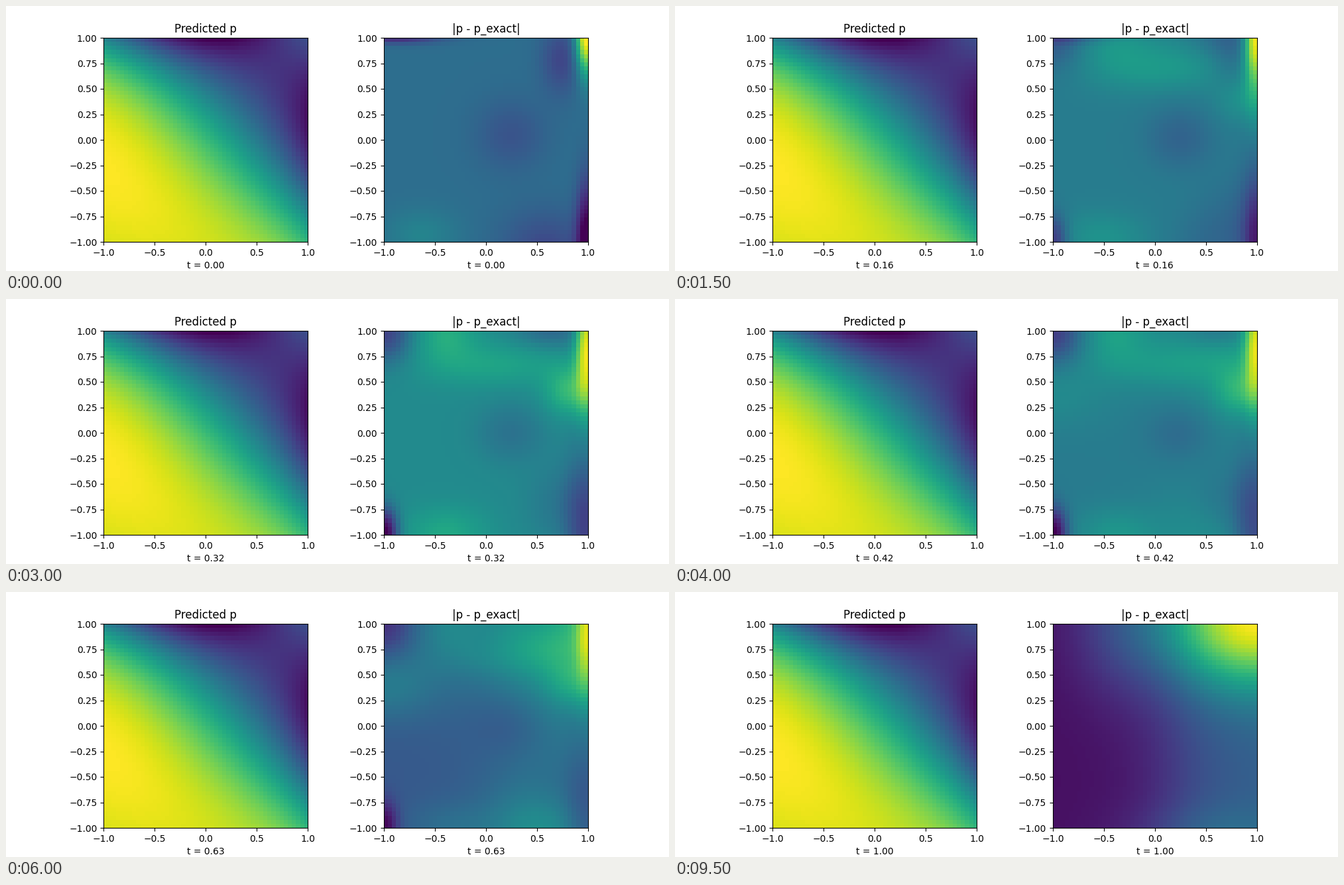
Write a matplotlib script that moves like this. It is 1000 px wide and 400 px high and loops after 10 s.

```python
import numpy as np
import matplotlib.pyplot as plt
from matplotlib.animation import FuncAnimation

N, FRAMES, INTERVAL = 50, 20, 500
MID = 0.32  # time at which the error is most spread out
axis = np.linspace(-1, 1, N)
X, Y = np.meshgrid(axis, axis)


def pressure(x, y, z=0.5):
    """Pressure of a Beltrami flow on one z slice, scaled to 0..1."""
    def term(a, b, c):
        return np.exp(2 * a) + 2 * np.sin(a + b) * np.cos(c + a) * np.exp(b + c)

    p = -(term(x, y, z) + term(y, z, x) + term(z, x, y))
    return (p - p.min()) / (p.max() - p.min())


def bump(amp, x, y, sx, sy):
    return amp * np.exp(-((X - x) / sx) ** 2 - ((Y - y) / sy) ** 2)


def start_pose():
    corners = bump(0.7, 1, 1.05, 0.1, 0.38) + bump(-0.36, 1, -1, 0.1, 0.6)
    dips = (bump(-0.1, 0.25, 0.05, 0.35, 0.35) + bump(-0.15, 0.75, 0.8, 0.2, 0.35)
            + bump(-0.14, 0.6, -1.1, 0.45, 0.4))
    edges = bump(-0.25, -0.9, 1.03, 0.45, 0.07) + bump(0.09, -0.65, -0.95, 0.35, 0.25)
    return 0.36 + corners + dips + edges


def middle_pose():
    corners = (bump(0.5, 1, 0.9, 0.1, 0.6) + bump(-0.25, 1, -1, 0.2, 0.8)
               + bump(-0.5, -1, -1, 0.12, 0.25) + bump(-0.28, -1, 1, 0.25, 0.3))
    ridge = (bump(0.14, -0.4, 1, 0.3, 0.3) + bump(0.1, 0.1, 0.68, 0.7, 0.22)
             + bump(0.2, 0.85, 0.42, 0.25, 0.25))
    dips = (bump(-0.1, 0.25, 0, 0.35, 0.3) + bump(-0.14, 0.65, 1.02, 0.35, 0.17)
            + bump(-0.08, 0.75, -0.7, 0.35, 0.4))
    return 0.48 + corners + ridge + dips + bump(0.12, -0.4, -1, 0.4, 0.25)


def end_pose():
    ramp = 0.04 + 0.27 / (1 + np.exp(-4 * (X - 0.2)))
    return (ramp + bump(0.7, 1, 1.05, 0.95, 0.65) + bump(0.12, -0.35, 1, 0.5, 0.7)
            + bump(0.09, 0.5, -1.1, 0.8, 0.3))


START, MIDDLE, END = start_pose(), middle_pose(), end_pose()
RISE = bump(0.08, 0, 0.8, 0.7, 0.3)
FADE = bump(0.13, -1, 0.4, 0.5, 0.35) + bump(0.1, 0.5, -1, 0.5, 0.4)


def error_field(t):
    """Blend start to middle to end, with a swell inside each half."""
    if t < MID:
        w, a, b, swell = t / MID, START, MIDDLE, RISE
    else:
        w, a, b, swell = (t - MID) / (1 - MID), MIDDLE, END, FADE
    return (1 - w) * a + w * b + np.sin(np.pi * w) * swell


fig, axes = plt.subplots(1, 2, figsize=(10, 4), dpi=100)
images = []
for ax, title, data in zip(axes, ("Predicted p", "|p - p_exact|"),
                           (pressure(X, Y), error_field(0))):
    images.append(ax.imshow(data, origin="lower", extent=(-1, 1, -1, 1),
                            cmap="viridis", vmin=0, vmax=1,
                            interpolation="nearest"))
    ax.set_title(title)
    ax.set_xticks(np.linspace(-1, 1, 5))
    ax.set_yticks(np.linspace(-1, 1, 9))


def update(i):
    t = i / (FRAMES - 1)
    images[1].set_data(error_field(t))
    for ax in axes:
        ax.set_xlabel(f"t = {t:.2f}")
    return images


anim = FuncAnimation(fig, update, frames=FRAMES, interval=INTERVAL,
                     repeat=True, repeat_delay=0)
plt.show()
```
